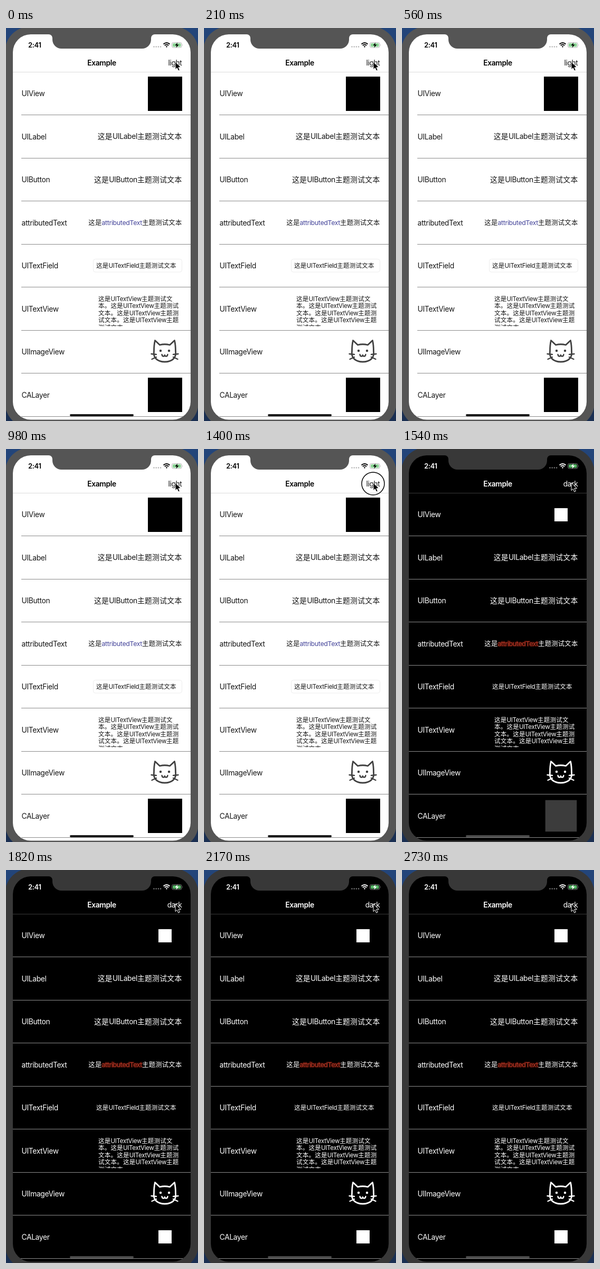
These frames come from a looping animation (364 px wide and 744 px high, 2940 ms). An HTML page:

```html
<!DOCTYPE html>
<html lang="zh-CN">
<head>
<meta charset="utf-8">
<title>Example</title>
<style>
html, body { margin: 0; width: 100%; height: 100%; overflow: hidden; background: linear-gradient(#23457a, #1a2f52); }
svg {
  display: block; width: 364px; height: 744px;
  --bezel: #555; --bg: #fff; --ink: #161616; --strong: #000; --line: #8a8a8a; --navline: #dcdcdc;
  --link: #45459a; --glow: none; --cat: #404040; --field: #ececec; --home: #1a1a1a; --dots: #b4b4b4; --battery: #8ad494;
}
svg.active { --bezel: #383838; }
svg.dark {
  --bg: #000; --ink: #fff; --strong: #fff; --line: #8e8e8e; --navline: #3a3a3a;
  --link: #c03c28; --glow: rgba(150, 30, 15, .3); --cat: #fff; --field: none; --home: #4a4a4a; --dots: #777; --battery: #55b565;
}
text {
  font: 13.8px Inter, "Noto Sans CJK SC", "Noto Sans CJK", sans-serif;
  letter-spacing: -.025em; fill: var(--ink); white-space: pre;
}
.cjk { letter-spacing: .022em; }
.end { text-anchor: end; }
.bold { font-weight: 600; fill: var(--strong); }
.mid { font-size: 12.3px; }
.small { font-size: 11.5px; }
.link { fill: var(--link); stroke: var(--glow); stroke-width: 3; paint-order: stroke; stroke-linejoin: round; }
.cat { fill: none; stroke: var(--cat); stroke-width: 2.8; stroke-linecap: round; stroke-linejoin: round; }
</style>
</head>
<body>
<svg id="stage" viewBox="0 0 364 744">
  <defs>
    <clipPath id="screen"><rect x="13" y="12" width="337" height="729.500" rx="34"/></clipPath>
    <clipPath id="textView"><rect x="170" y="500" width="164" height="64.500"/></clipPath>
  </defs>
  <rect x="-2" y="-3" width="367" height="760" rx="48" fill="var(--bezel)"/>
  <g clip-path="url(#screen)">
    <rect width="364" height="744" fill="var(--bg)"/>
    <path d="M13 83.500H350" stroke="var(--navline)"/>
    <g id="rows"></g>
    <rect x="121" y="731" width="121" height="4" rx="2" fill="var(--home)"/>
  </g>
  <path d="M79 10V12H81A7 7 0 0 1 88 19V22A17 17 0 0 0 105 39H258A17 17 0 0 0 275 22V19A7 7 0 0 1 282 12H284V10Z" fill="var(--bezel)"/>

  <text class="bold" x="42" y="37" style="font-size:13px">2:41</text>
  <path d="M280.500 35.500H295" stroke="var(--dots)" stroke-width="2.600" stroke-linecap="round" stroke-dasharray="0 4.200"/>
  <g fill="none" stroke="var(--strong)" stroke-width="2">
    <path d="M298.500 30.500Q304.500 25.500 310.500 30.500M300.800 33Q304.500 30 308.200 33"/>
    <path d="M304.500 37L302.600 34.800Q304.500 33.500 306.400 34.800Z" fill="var(--strong)" stroke="none"/>
  </g>
  <rect x="314.500" y="27.500" width="18.500" height="9.500" rx="2.800" fill="none" stroke="var(--dots)"/>
  <rect x="316" y="29" width="15.500" height="6.500" rx="1.500" fill="var(--battery)"/>
  <path d="M334.500 30.500q1.500 1.800 0 3.500z" fill="var(--dots)"/>
  <path d="M325 27.500L320.500 33H323.500L322.500 37.500L327.500 31.500H324.300Z" fill="var(--strong)"/>

  <text class="bold" x="181.500" y="71" text-anchor="middle">Example</text>
  <text id="mode" class="end" x="333.500" y="71"></text>
  <circle id="tap" cx="320.500" cy="65.500" r="21.500" fill="none" stroke="#000" stroke-width="1.500"/>
  <path d="M321 64V78.500L324.300 75.500L326.700 81L329.300 79.900L327 74.500H331.500Z" fill="#000" stroke="#fff"/>
</svg>
<script>
const LOOP = 2940, STEP = 70, PRESS = 1400, FADE = 1470, SWITCH = 1540;
const ROW = 81.5;
const $ = id => document.getElementById(id);
const stage = $('stage');

const mixed = s => s.replace(/[^\x00-\x7f]+/g, '<tspan class="cjk">$&</tspan>');
const text = (x, y, cls, s) => `<text x="${x}" y="${y}" class="${cls}">${mixed(s)}</text>`;
const phrase = name => `这是${name}主题测试文本`;
const lines = ['这是UITextView主题测试文', '本。这是UITextView主题测试', '文本。这是UITextView主题测',
  '试文本。这是UITextView主题', '测试文本。'];

const cat = `<g class="cat">
  <path d="M280.500 612Q280.500 600 282.500 591.500L291.500 600Q301 597.500 310.500 600L319.500 591.500Q321.500 600 321.500 612
    C323.500 625 314 632 301 632S278.500 625 280.500 612Z"/>
  <path stroke-width="2.400" d="M275.500 617L285 618M276.500 627L285 623M326.500 617L317 618M325.500 627L317 623
    M295.500 618Q296 621.500 298.500 621.500T301 619Q301 621.500 303.500 621.500T306.500 618"/>
  <path stroke-width="4.400" d="M293 611h.1M309 611h.1"/></g>`;

const rows = [
  ['UIView', '<rect id="view"/>'],
  ['UILabel', text(333.5, 210, 'end', phrase('UILabel'))],
  ['UIButton', text(333.5, 291.5, 'end', phrase('UIButton'))],
  ['attributedText', text(333.5, 373, 'end mid', phrase('<tspan class="link">attributedText</tspan>'))],
  ['UITextField', '<rect x="165.500" y="437.500" width="168" height="24.500" rx="4" fill="none" stroke="var(--field)"/>' +
    text(171, 454, 'small', phrase('UITextField'))],
  ['UITextView', `<g clip-path="url(#textView)">${lines.map((s, i) => text(175, 516.5 + 13.5 * i, 'small', s)).join('')}</g>`],
  ['UIImageView', cat],
  ['CALayer', '<rect id="layer"/>'],
];
$('rows').innerHTML = rows.map(([name, content], i) =>
  text(29.5, 129 + ROW * i, '', name) + content +
  `<rect class="rule" y="${Math.round(164 + ROW * i)}" width="340" height="1" fill="var(--line)"/>`).join('');
const rules = document.querySelectorAll('.rule');

function square(id, cy, p) {
  const size = 65 - 40 * p, gray = Math.round(255 * p ** .72);
  const attrs = { x: 301.5 - size / 2, y: cy - size / 2, width: size, height: size, fill: `rgb(${gray},${gray},${gray})` };
  for (const k in attrs) $(id).setAttribute(k, attrs[k]);
}

// cubic-bezier(.25, .1, .25, 1)
function ease(x) {
  if (x <= 0 || x >= 1) return x <= 0 ? 0 : 1;
  const curve = (a, b, u) => 3 * a * u * (1 - u) ** 2 + 3 * b * u * u * (1 - u) + u ** 3;
  let lo = 0, hi = 1;
  for (let i = 0; i < 20; i++) {
    const u = (lo + hi) / 2;
    if (curve(.25, .25, u) < x) lo = u; else hi = u;
  }
  return curve(.1, 1, lo);
}

function draw() {
  const t = Math.floor(performance.now() % LOOP / STEP) * STEP;
  const dark = t >= SWITCH;
  stage.classList.toggle('active', t >= FADE);
  stage.classList.toggle('dark', dark);
  $('mode').textContent = dark ? 'dark' : 'light';
  $('mode').style.opacity = t === FADE ? .25 : 1;
  $('tap').style.display = t >= PRESS && !dark ? '' : 'none';
  rules.forEach(r => r.setAttribute('x', dark ? 13 : 29));
  square('view', 124.5, dark ? 1 : 0);
  square('layer', 694.5, dark ? ease((t - 1509) / 250) : 0);
  requestAnimationFrame(draw);
}
draw();
</script>
</body>
</html>
```
